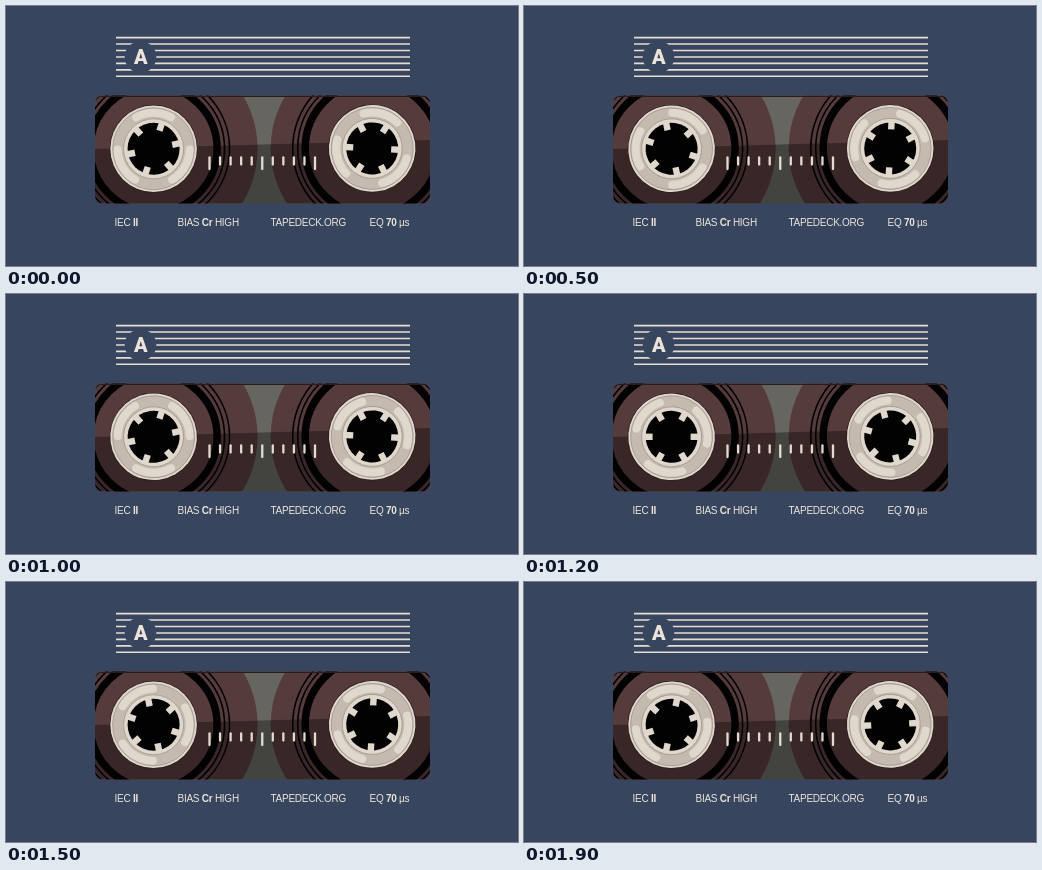
Recreate the animation shown at these times as an HTML page. Size 512x260 px, loop 2 s.

```html
<!DOCTYPE html>
<html lang="en">
<head>
<meta charset="utf-8">
<title>Cassette</title>
<style>
  html, body { margin: 0; width: 100%; height: 100%; overflow: hidden; background: #37455f; }
  svg { display: block; width: 100vw; height: 100vh; }
  text { fill: #ece5da; }
  .label { font: 10px "Liberation Sans", Arial, sans-serif; letter-spacing: -.26px; }
  .label tspan { font-weight: bold; }
  .side { font: 900 20px Roboto, sans-serif; text-anchor: middle; }
</style>
</head>
<body>
<svg viewBox="0 0 512 260">
  <defs>
    <clipPath id="window"><rect x="89" y="89.5" width="335" height="108" rx="8"/></clipPath>
  </defs>
  <rect width="512" height="260" fill="#37455f"/>
  <g id="lines" stroke="#e6ddd1" stroke-width="1.6"></g>
  <circle cx="134.5" cy="51" r="15.8" fill="#37455f"/>
  <text class="side" x="134.7" y="58.2">A</text>
  <g clip-path="url(#window)">
    <rect x="89" y="89" width="335" height="109" fill="#66655f"/>
    <g id="packs"></g>
    <path d="M89 143L424 134V198H89Z" opacity=".34"/>
    <path d="M89 90.2H424" stroke="#2a1b1e" stroke-width="1.6"/>
  </g>
  <g id="ticks" stroke="#e3dbcf" stroke-width="2.3" stroke-linecap="round"></g>
  <g id="reels"></g>
  <text class="label" x="108.5" y="220">IEC <tspan>II</tspan></text>
  <text class="label" x="171.5" y="220">BIAS <tspan>Cr</tspan> HIGH</text>
  <text class="label" x="264.5" y="220">TAPEDECK.ORG</text>
  <text class="label" x="363.5" y="220">EQ <tspan>70</tspan> µs</text>
</svg>
<script>
const LOOP = 2000, STEPS = 20, TURN = 120;
const CREAM = '#e0d8cc', GREY = '#c4baaf', EDGE = '#93877e', INK = '#030203';
const reels = [
  { x: 147.6, y: 142.8, pack: 104, band: 63.5, start: 0 },
  { x: 366.2, y: 142.4, pack: 101.5, band: 67, start: 15 }
];

function add(parent, tag, attrs) {
  const el = document.createElementNS('http://www.w3.org/2000/svg', tag);
  for (const key in attrs) el.setAttribute(key, attrs[key]);
  return parent.appendChild(el);
}
const byId = id => document.getElementById(id);
const disc = (parent, r, fill) => add(parent, 'circle', { r, fill });
const ring = (parent, r, stroke, width) =>
  add(parent, 'circle', { r, fill: 'none', stroke, 'stroke-width': width });
const polar = (r, deg) => {
  const a = deg * Math.PI / 180;
  return `${r * Math.sin(a)} ${-r * Math.cos(a)}`;
};

for (let i = 0; i < 7; i++) {
  const y = 31.6 + i * 6.45;
  add(byId('lines'), 'path', { d: `M110 ${y}H404` });
}
for (let i = 0; i < 11; i++) {
  add(byId('ticks'), 'path', { d: `M${203.5 + i * 10.55} 151.5V${i % 5 ? 158.5 : 163}` });
}

for (const reel of reels) {
  const at = { transform: `translate(${reel.x} ${reel.y})` };
  const pack = add(byId('packs'), 'g', at);
  disc(pack, reel.pack, '#563b3d');
  ring(pack, reel.band, INK, 7.5);
  ring(pack, reel.band + 7.5, INK, 1.6);
  ring(pack, reel.band + 12.5, INK, 1.6);

  const body = add(byId('reels'), 'g', at);
  disc(body, 44, '#2b1b1d');
  reel.spin = add(body, 'g', {});
  disc(reel.spin, 43.3, CREAM);
  disc(reel.spin, 41, GREY);
  for (let a = 0; a < 360; a += 120) {
    add(reel.spin, 'path', {
      d: `M${polar(36, a - 29)}A36 36 0 0 1 ${polar(36, a + 29)}`,
      fill: 'none', stroke: CREAM, 'stroke-width': 8, 'stroke-linecap': 'round'
    });
  }
  ring(reel.spin, 41, EDGE, 0.6);
  disc(reel.spin, 30, CREAM);
  ring(reel.spin, 30, EDGE, 0.6);
  disc(reel.spin, 26, INK);
  for (let a = 18; a < 360; a += 60) {
    add(reel.spin, 'rect', { x: -3.2, y: -27, width: 6.4, height: 8, fill: CREAM, transform: `rotate(${a})` });
  }
}

function draw(now) {
  const step = Math.floor(now % LOOP / LOOP * STEPS);
  for (const { spin, start } of reels) {
    spin.setAttribute('transform', `rotate(${start + step * TURN / STEPS})`);
  }
  requestAnimationFrame(draw);
}
draw(performance.now());
</script>
</body>
</html>
```
